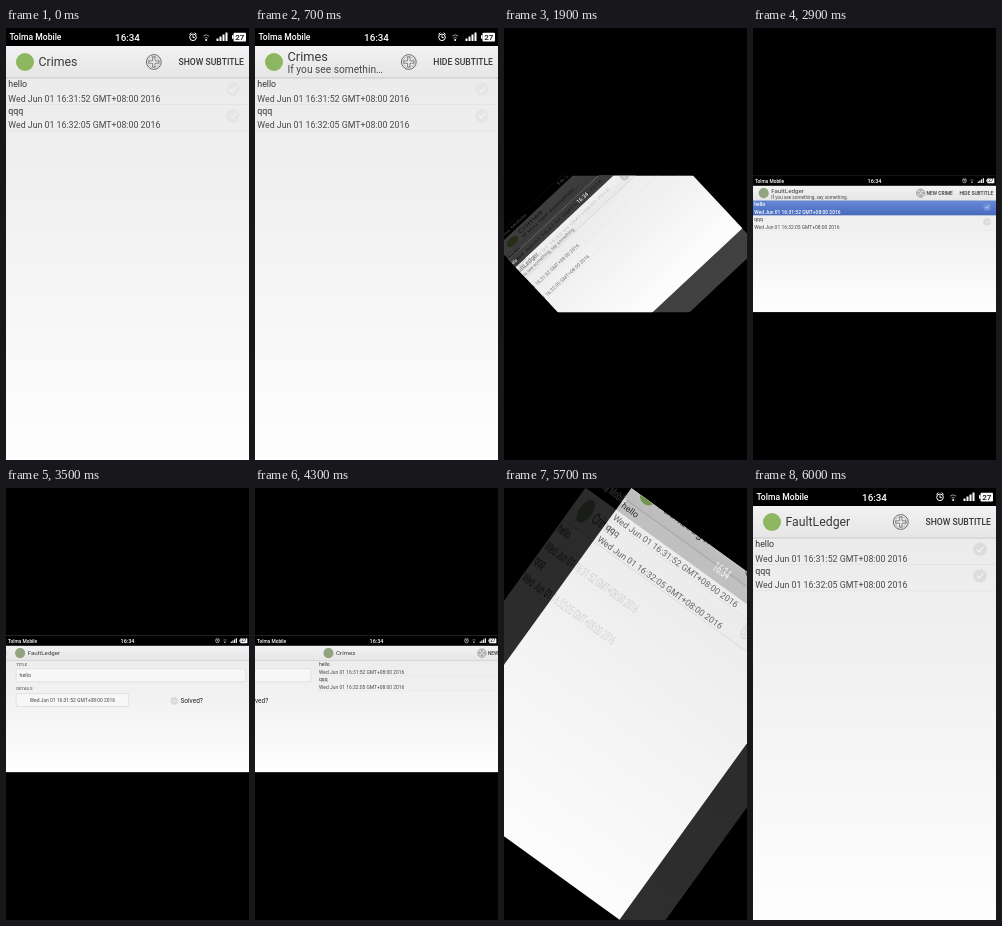
Animation of 243x432 px, one loop 6100 ms. Source, as an HTML page:

```html
<!DOCTYPE html>
<html lang="en">
<head>
<meta charset="utf-8">
<style>
  html, body { margin: 0; width: 100%; height: 100%; overflow: hidden; background: #000; }
  #stage { display: block; width: 100vw; height: 100vh; }
  text { font-family: Roboto, "Liberation Sans", sans-serif; }
</style>
</head>
<body>
<svg id="stage" viewBox="0 0 243 432">
  <defs>
    <linearGradient id="paper" x2="0" y2="1">
      <stop offset="0" stop-color="#e9e9e9"/>
      <stop offset=".45" stop-color="#f2f2f2"/>
      <stop offset="1" stop-color="#fefefe"/>
    </linearGradient>
    <linearGradient id="bar" x2="0" y2="1">
      <stop offset="0" stop-color="#f3f1f3"/>
      <stop offset="1" stop-color="#e6e6e6"/>
    </linearGradient>
    <linearGradient id="pressed" x2="0" y2="1">
      <stop offset="0" stop-color="#688ad6"/>
      <stop offset="1" stop-color="#4669bd"/>
    </linearGradient>
  </defs>
  <g id="scene"></g>
</svg>
<script>
const LOOP = 6100, STEP = 100;
const SHORT = 243, LONG = 432, FIT = SHORT / LONG;
const CARRIER = 'Tolma Mobile', APP = 'FaultLedger';
const scene = document.getElementById('scene');

const mix = (a, b, p) => a + (b - a) * p;
const ease = (t, start, duration, power) =>
  1 - Math.pow(1 - Math.min(1, Math.max(0, (t - start) / duration)), power);

const text = (x, y, size, fill, label, extra = '') =>
  `<text x="${x}" y="${y}" font-size="${size}" fill="${fill}" ${extra}>${label}</text>`;
const rect = (x, y, w, h, fill, extra = '') =>
  `<rect x="${x}" y="${y}" width="${w}" height="${h}" fill="${fill}" ${extra}/>`;
const path = (d, stroke, width) =>
  `<path d="${d}" fill="none" stroke="${stroke}" stroke-width="${width}"/>`;
const move = (x, y, body) => `<g transform="translate(${x} ${y})">${body}</g>`;
const MEDIUM = 'font-weight="500"', END = 'text-anchor="end"', MIDDLE = 'text-anchor="middle"';

function statusBar(w) {
  const icons =
    '<circle cx="187" cy="9.3" r="3.3" fill="none" stroke="#fff"/>' +
    path('M187 7.3V9.6H188.8M183.4 6.4L185.4 4.7M190.6 6.4L188.6 4.7', '#fff', 1) +
    path('M197.2 8.2Q200.2 5.4 203.2 8.2M198.6 10.2Q200.2 8.8 201.8 10.2', '#999', 1) +
    '<circle cx="200.2" cy="12" r="1" fill="#fff"/>' +
    [0, 1, 2, 3].map(i => rect(210.5 + i * 3, 10.5 - i * 2, 2, 2.5 + i * 2, '#fff')).join('') +
    rect(227.5, 4.8, 12.5, 8.6, '#fff', 'rx="1"') + rect(226, 7.2, 1.5, 3.6, '#fff') +
    text(233.8, 12, 8, '#111', '27', `${MEDIUM} ${MIDDLE}`);
  return rect(0, 0, w, 18, '#000') +
    text(3.5, 12.2, 8.6, '#fff', CARRIER, MEDIUM) +
    text(w / 2, 12.7, 9.8, '#fff', '16:34', `${MEDIUM} ${MIDDLE}`) +
    move(w - SHORT, 0, icons);
}

function plusIcon(x, y) {
  return move(x, y,
    '<circle r="7.4" fill="none" stroke="#6a6a6a" stroke-width="1"/>' +
    '<circle r="5.6" fill="none" stroke="#999" stroke-width=".6"/>' +
    path('M-1.2 -5V-1.2H-5V1.2H-1.2V5H1.2V1.2H5V-1.2H1.2V-5Z', '#6a6a6a', .8));
}

const check = (x, y, fill) => move(x, y,
  `<circle r="6.8" fill="${fill}"/>` + path('M-3 0L-.8 2.4L3.4 -2.6', '#f2f2f2', 1.3));

function pageBase(v, title, subtitle) {
  const mid = v.wide ? 31 : 34, size = v.wide ? 11 : 12.3;
  const out = rect(0, 0, v.w, v.h, 'url(#paper)') +
    rect(0, 18, v.w, v.top - 18, 'url(#bar)') +
    rect(0, v.top - .5, v.w, 1, '#cacaca') +
    `<circle cx="19" cy="${mid}" r="9" fill="${v.wide ? '#91a37f' : '#8db660'}"/>`;
  if (!subtitle) return out + text(32.5, mid + size * .35, size, '#3a3a3a', title);
  const line = v.wide ? 'If you see something, say something.' : 'If you see somethin…';
  return out + text(32.5, v.wide ? 30 : 33, v.wide ? 11 : 12.8, '#3a3a3a', title) +
    text(32.5, v.wide ? 41 : 45.3, v.wide ? 8.3 : 10.2, '#4a4a4a', line);
}

function listPage(v, { title, subtitle, press, faint }) {
  const mid = v.wide ? 31 : 34, shift = subtitle ? 6 : 0;
  const caps = (x, label, extra) => text(x, mid + 3, 8.65, '#363636', label, `${MEDIUM} ${extra}`);
  let out = pageBase(v, title, subtitle) +
    caps(v.w - 5, subtitle ? 'HIDE SUBTITLE' : 'SHOW SUBTITLE', END);
  out += v.wide
    ? plusIcon(292 + shift, mid) + caps(302.5 + shift, 'NEW CRIME', '')
    : plusIcon(147.8 + shift, mid);
  [['hello', '31:52'], ['qqq', '32:05']].forEach(([name, clock], i) => {
    const y = v.top + i * 26.5, on = press && i === 0;
    if (on) out += rect(0, y, v.w, 26.5, 'url(#pressed)');
    out += text(2.3, y + 9.2, 8.8, on ? '#fff' : '#333', name, on ? MEDIUM : '') +
      text(2.3, y + 23.8, 8.8, on ? '#fff' : '#484848',
        `Wed Jun 01 16:${clock} GMT+08:00 2016`, on ? MEDIUM : '') +
      check(v.w - 16, y + 11.3, on ? '#6f90d6' : faint ? '#e5e5e5' : '#dcdcdc') +
      rect(0, y + 26, v.w, .7, '#e1e1e1');
  });
  return out;
}

function detailPage(v) {
  const label = (y, name) => text(12, y, 7.5, '#666', name, MEDIUM);
  const box = (x, y, w, h) => rect(x, y, w, h, '#f7f7f7', 'stroke="#d2d2d2" rx="1"');
  return pageBase(v, APP, false) +
    label(54, 'TITLE') + box(12, 59, 408, 23) + text(18, 74, 9.5, '#444', 'hello') +
    label(96, 'DETAILS') + box(12, 103, 200, 23) +
    text(112, 118, 8.8, '#444', 'Wed Jun 01 16:31:52 GMT+08:00 2016', MIDDLE) +
    check(293, 116, '#dadada') + text(304, 120, 11.6, '#222', 'Solved?');
}

const TALL = { w: SHORT, h: LONG, top: 50, wide: false };
const WIDE = { w: LONG, h: SHORT, top: 44.3, wide: true };

const list = (v, options) => listPage(v, options) + statusBar(v.w);

// The leaving page moves left while the next one follows from the right.
function slide(leaving, entering, p) {
  const x = -WIDE.w * p;
  return rect(0, 0, WIDE.w, WIDE.h, 'url(#paper)') +
    move(x, 0, leaving) + move(x + WIDE.w, 0, entering) + statusBar(WIDE.w);
}

// The old screen stretches to the new shape, turning and fading over the new one.
function turn(before, after, v, direction, p) {
  const w = mix(v.h, v.w, p), h = mix(v.w, v.h, p);
  const frame = `x="${-w / 2}" y="${-h / 2}" width="${w}" height="${h}" preserveAspectRatio="none"`;
  return `<svg width="${v.w}" height="${v.h}">` + rect(0, 0, v.w, v.h, '#000') +
    `<g transform="translate(${v.w / 2} ${v.h / 2}) rotate(${direction * 90 * (1 - p)})">` +
    `<svg ${frame} viewBox="${-w / 2} ${-h / 2} ${w} ${h}">${move(-v.w / 2, -v.h / 2, after)}</svg>` +
    `<svg ${frame} viewBox="0 0 ${v.h} ${v.w}" opacity="${Math.pow(1 - p, 1.85)}">${before}</svg>` +
    '</g></svg>';
}

const letterbox = body => rect(0, 0, SHORT, LONG, '#000') +
  `<svg y="${(LONG - SHORT * FIT) / 2}" width="${SHORT}" height="${SHORT * FIT}" ` +
  `viewBox="0 0 ${LONG} ${SHORT}">${body}</svg>`;

const first = { title: 'Crimes', subtitle: false, faint: true };
const hinted = { title: 'Crimes', subtitle: true, faint: true };
const turned = { title: APP, subtitle: true };
const returned = { title: 'Crimes', subtitle: false };
const last = { title: APP, subtitle: false };

function wideScene(t) {
  if (t < 2300) return turn(list(TALL, hinted), list(WIDE, turned), WIDE, -1, ease(t, 1800, 500, 3.3));
  if (t < 3200) return list(WIDE, { ...turned, press: t >= 2900 && t < 3000 });
  if (t < 4200) return slide(listPage(WIDE, turned), detailPage(WIDE), ease(t, 3100, 500, 2.65));
  return slide(detailPage(WIDE), listPage(WIDE, returned), ease(t, 4100, 500, 2.65));
}

function draw(t) {
  const tallTurn = p => turn(list(WIDE, returned), list(TALL, last), TALL, 1, p);
  if (t < 400) return list(TALL, first);
  if (t < 1500) return list(TALL, hinted);
  if (t < 1600) return rect(0, 0, SHORT, LONG, 'url(#paper)') +
    turn(list(TALL, hinted), '', WIDE, -1, 0);
  if (t < 5300) return letterbox(wideScene(t));
  if (t < 5400) return letterbox(list(WIDE, returned) + tallTurn(0));
  if (t < 6000) return tallTurn(ease(t, 5600, 400, 3.2));
  return list(TALL, last);
}

const start = performance.now();
let shown = -1;
function tick() {
  const t = Math.floor((performance.now() - start) % LOOP / STEP) * STEP;
  if (t !== shown) scene.innerHTML = draw(shown = t);
  requestAnimationFrame(tick);
}
tick();
</script>
</body>
</html>
```
